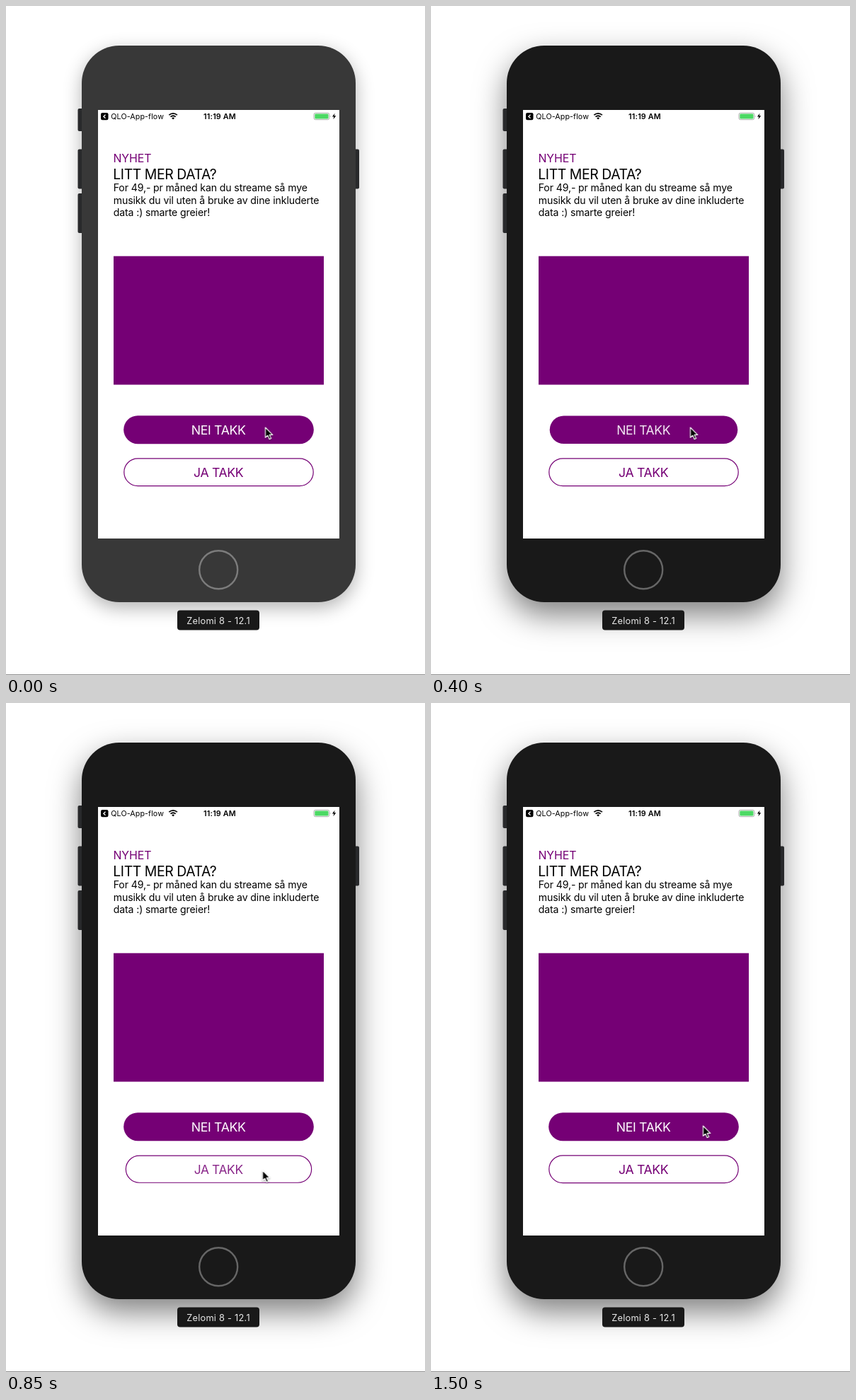
Recreate the animation shown at these times as an HTML page. Size 592 by 946 pixels, loop 1550 ms.

```html
<!DOCTYPE html>
<html lang="no">
<head>
<meta charset="utf-8">
<title>Phone buttons</title>
<style>
@property --press { syntax: "<number>"; inherits: true; initial-value: 0; }

:root { --t: 0; --purple: #750075; }
html, body { margin: 0; width: 100%; height: 100%; overflow: hidden; background: #fff; }
.stage { position: relative; width: 592px; height: 946px; overflow: hidden; }
svg { position: absolute; inset: 0; }
text { font-family: Inter, sans-serif; white-space: pre; }

/* Every animation is paused and placed by the clock in --t. */
.case, .ring, .no, .yes, .cursor {
  animation: 1550ms linear calc(var(--t) * -1ms) infinite paused;
}

.case {
  position: absolute; left: 107px; top: 56px; width: 387px; height: 787px;
  border-radius: 53px;
  animation-name: wake; animation-timing-function: step-end;
}
.ring { fill: none; stroke-width: 2.4; animation-name: light; animation-timing-function: step-end; }
@keyframes wake {
  0% { background: #383838; box-shadow: 0 8px 26px rgba(0, 0, 0, .3); }
  3.2%, 100% { background: #191919; box-shadow: 0 18px 44px rgba(0, 0, 0, .5); }
}
@keyframes light {
  0% { stroke: #7c7c7c; }
  3.2%, 100% { stroke: #666; }
}

.no, .yes {
  transform: scale(calc(1 - .1 * var(--press)));
  animation-timing-function: cubic-bezier(.455, .03, .515, .955);
}
.no { transform-origin: 300.5px 599.2px; animation-name: tap-no; }
.yes { transform-origin: 300.5px 659.2px; animation-name: tap-yes; }
.no text, .yes text {
  font-size: 17.7px; letter-spacing: -.35px; text-anchor: middle;
  opacity: calc(1 - .8 * var(--press));
}
@keyframes tap-no {
  0%, .32% { --press: 0; }
  10%, 13.5% { --press: 1; }
  29.7%, 100% { --press: 0; }
}
@keyframes tap-yes {
  0%, 51.9% { --press: 0; }
  61.6%, 71.6% { --press: 1; }
  87.7%, 100% { --press: 0; }
}

.cursor {
  filter: drop-shadow(0 1px 1px rgba(0, 0, 0, .35));
  animation-name: travel; animation-timing-function: ease-in-out;
}
@keyframes travel {
  0%, 35.5% { transform: translate(366.5px, 596px); }
  51.6%, 78% { transform: translate(362.5px, 661px); }
  95.5%, 100% { transform: translate(384.5px, 598px); }
}
</style>
</head>
<body>
<div class="stage">
  <div class="case"></div>
  <svg width="592" height="946" viewBox="0 0 592 946">
    <rect y="945" width="592" height="1" fill="#8f8f8f"/>

    <g fill="#28292b">
      <path d="M107 145h-3.500q-2 0-2 2v28q0 2 2 2h3.500z"/>
      <path d="M107 202.500h-3.500q-2 0-2 2v52q0 2 2 2h3.500z"/>
      <path d="M107 265h-3.500q-2 0-2 2v52q0 2 2 2h3.500z"/>
      <path d="M494 202.500h3q2 0 2 2v52q0 2-2 2h-3z"/>
    </g>
    <circle class="ring" cx="300.200" cy="797.200" r="27"/>

    <rect x="242" y="854.500" width="116" height="28" rx="4" fill="#191919"/>
    <text x="300" y="873.800" font-size="12.800" letter-spacing=".25" text-anchor="middle" fill="#e8e8e8">Zelomi 8 - 12.1</text>

    <rect x="130" y="147" width="341" height="606" fill="#fff"/>

    <!-- status bar -->
    <rect x="134" y="151" width="10.500" height="10.300" rx="2.200"/>
    <path d="M140.500 153.700l-2.600 2.500 2.600 2.500" fill="none" stroke="#fff" stroke-width="1.300"/>
    <text x="148.300" y="160" font-size="10.700" letter-spacing=".1">QLO-App-flow</text>
    <g fill="none" stroke="#000" stroke-width="1.700">
      <path d="M230.300 154.200q5.800-4.800 11.600 0"/>
      <path d="M232.500 156.700q3.600-2.900 7.200 0"/>
    </g>
    <path d="M236.100 160.400l-2-2.100q2-1.500 4 0z"/>
    <text x="302" y="160" font-size="10.800" font-weight="600" letter-spacing=".15" text-anchor="middle">11:19 AM</text>
    <rect x="435" y="151.300" width="21.800" height="9.400" rx="2.300" fill="none" stroke="#a5a5a5" stroke-width=".9"/>
    <rect x="436.300" y="152.600" width="19.200" height="6.800" rx="1.200" fill="#4cd964"/>
    <path d="M457.900 154.500q1.400 1.500 0 3z" fill="#a5a5a5"/>
    <path d="M464.600 151.800l-3.700 4.800h2.400l-.9 3.700 3.900-5h-2.500z"/>

    <!-- offer -->
    <text x="151.500" y="221" font-size="15.900" letter-spacing="-.1" fill="#750075">NYHET</text>
    <text x="151.300" y="245" font-size="19.400" letter-spacing="-.42">LITT MER DATA?</text>
    <g font-size="14.100" letter-spacing="-.12">
      <text x="151.700" y="262.400">For 49,- pr måned kan du streame så mye</text>
      <text x="151.700" y="279.700">musikk du vil uten å bruke av dine inkluderte</text>
      <text x="151.700" y="297">data :) smarte greier!</text>
    </g>
    <rect x="152" y="353.700" width="297" height="181.800" fill="#750075"/>

    <g class="no">
      <rect x="166.200" y="579.200" width="268.600" height="40" rx="20" fill="#750075"/>
      <text x="300.200" y="605.700" fill="#fff">NEI TAKK</text>
    </g>
    <g class="yes">
      <rect x="166.800" y="639.800" width="267.400" height="38.800" rx="19.400" fill="#fff" stroke="#750075" stroke-width="1.200"/>
      <text x="300.200" y="665.700" fill="#750075">JA TAKK</text>
    </g>

    <path class="cursor" d="M0 0v14.300l3.300-3 2.300 5.300 2.500-1.100-2.300-5.100h4.400z" stroke="#fff" stroke-width="1.200" stroke-linejoin="round"/>
  </svg>
</div>
<script>
const LOOP = 1550, STEP = 50;
const start = performance.now();

function tick() {
  const t = (performance.now() - start) % LOOP;
  document.documentElement.style.setProperty("--t", Math.floor(t / STEP) * STEP);
  requestAnimationFrame(tick);
}
tick();
</script>
</body>
</html>
```
